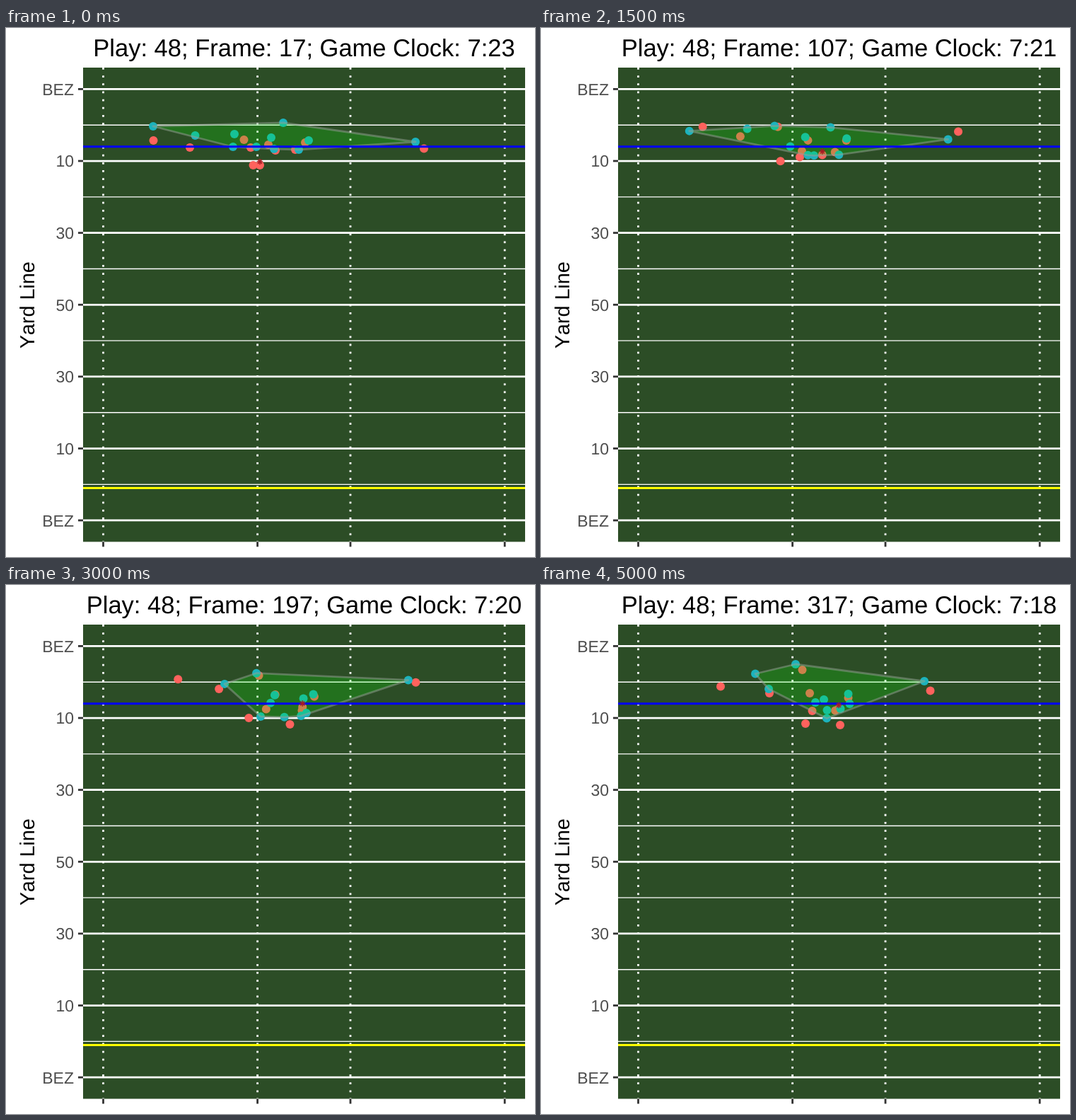
Recreate the animation shown at these times as an HTML page with a canvas. Size 748 by 748 pixels, loop 5.5 s.

```html
<!DOCTYPE html>
<html lang="en">
<head>
<meta charset="utf-8">
<title>Play tracking</title>
<style>
html, body { margin: 0; width: 100%; height: 100%; overflow: hidden; background: #fff; }
canvas { display: block; }
</style>
</head>
<body>
<canvas id="stage" width="748" height="748"></canvas>
<script>
const ctx = document.getElementById('stage').getContext('2d');
const FONT = '"Liberation Sans", Arial, sans-serif';
const STEP = 500, STEPS = 11;
const LEFT = 109, RIGHT = 734, TOP = 56, BOTTOM = 726.5;
const FIRST = 86.4, GAP = 101.63, LINE = 2.79;
const HASHES = [137.5, 355.6, 487, 705.2];
const LABELS = ['BEZ', '10', '30', '50', '30', '10', 'BEZ'];

// Smooth curve through evenly timed key points; three of them make a parabola
function curve(keys) {
  const n = keys.length - 1;
  const beyond = (a, b, c) => 3 * a - 3 * b + c;
  const v = [beyond(keys[0], keys[1], keys[2]), ...keys, beyond(keys[n], keys[n - 1], keys[n - 2])];
  return t => {
    const i = Math.min(Math.floor(t * n), n - 1), u = t * n - i;
    const [a, b, c, d] = v.slice(i, i + 4);
    return b + u / 2 * (c - a + u * (2 * a - 5 * b + 4 * c - d + u * (3 * (b - c) + d - a)));
  };
}

function path(...points) {
  const x = curve(points.map(p => p[0])), y = curve(points.map(p => p[1]));
  return t => ({ x: x(t), y: y(t) });
}

const runner = path([359, 194], [414, 174], [421, 175]);

const offense = [
  path([208.5, 159], [239, 134], [254, 143.5]),
  path([260, 169], [295, 148], [323, 153]),
  path([336.5, 158], [336, 138], [362, 126], [369.5, 120]),
  path([371, 165], [380, 156], [380, 153]),
  path([346, 169], [369, 184], [408, 199], [423, 198]),
  path([349.5, 194], [340, 187.5], [374, 196]),
  path([381, 173], [367, 175], [383.5, 178]),
  path([409, 172], [418, 177], [416, 177.5]),
  path([423, 162], [435, 158], [434.5, 159.5]),
  path([591, 170.5], [584, 139], [550.5, 149.5]),
  runner
];

const defense = [
  path([208, 139], [208, 138], [228, 157], [360, 186], [410, 165], [303, 125.5]),
  path([267.5, 152], [304, 140], [322, 147]),
  path([323, 150], [332, 137], [358, 122], [360, 112]),
  path([321, 168], [368, 167], [388, 166]),
  path([354, 168], [389, 185], [404, 188.5]),
  path([375, 155], [377, 155], [400, 162]),
  path([379, 171], [388, 181], [421, 185], [404.5, 177]),
  path([414, 172], [424, 181], [423.5, 175]),
  path([428, 159], [434, 155], [434.5, 154]),
  path([579, 161], [575, 156], [566, 131], [542, 136]),
  path([392, 134], [411, 142], [423, 164], [436.5, 168])
];

function hull(points) {
  const sorted = [...points].sort((a, b) => a.x - b.x || a.y - b.y);
  const half = list => {
    const out = [];
    for (const p of list) {
      while (out.length > 1) {
        const a = out[out.length - 2], b = out[out.length - 1];
        if ((b.x - a.x) * (p.y - a.y) - (b.y - a.y) * (p.x - a.x) > 0) break;
        out.pop();
      }
      out.push(p);
    }
    return out.slice(0, -1);
  };
  return [...half(sorted), ...half(sorted.reverse())];
}

function line(x1, y1, x2, y2, color, width) {
  ctx.strokeStyle = color;
  ctx.lineWidth = width;
  ctx.beginPath();
  ctx.moveTo(x1, y1);
  ctx.lineTo(x2, y2);
  ctx.stroke();
}

const across = (y, color, width) => line(LEFT, y, RIGHT, y, color, width);

function text(str, x, y, size, color, align) {
  ctx.font = size + 'px ' + FONT;
  ctx.fillStyle = color;
  ctx.textAlign = align;
  ctx.fillText(str, x, y);
}

function dot(p, color) {
  ctx.fillStyle = color;
  ctx.beginPath();
  ctx.arc(p.x, p.y, 6, 0, Math.PI * 2);
  ctx.fill();
}

function drawField() {
  ctx.fillStyle = '#fff';
  ctx.fillRect(0, 0, 748, 748);
  ctx.fillStyle = '#2c4d26';
  ctx.fillRect(LEFT, TOP, RIGHT - LEFT, BOTTOM - TOP);
  LABELS.forEach((label, i) => {
    const y = FIRST + i * GAP;
    if (i < LABELS.length - 1) across(y + GAP / 2, '#fff', LINE / 2);
    across(y, '#fff', LINE);
    line(LEFT - 7, y, LEFT, y, '#333', LINE);
    text(label, 96, y + 8.4, 23, '#4d4d4d', 'right');
  });
  for (const x of HASHES) {
    ctx.setLineDash([LINE, LINE * 3]);
    line(x, TOP, x, BOTTOM, '#fff', LINE);
    ctx.setLineDash([]);
    line(x, BOTTOM, x, BOTTOM + 7, '#333', LINE);
  }
  ctx.save();
  ctx.translate(40.3, 391.8);
  ctx.rotate(-Math.PI / 2);
  text('Yard Line', 0, 0, 28.75, '#000', 'center');
  ctx.restore();
}

function drawTitle(step) {
  const clock = 443 - Math.ceil(step / 2);
  const time = Math.floor(clock / 60) + ':' + String(clock % 60).padStart(2, '0');
  text(`Play: 48; Frame: ${17 + step * 30}; Game Clock: ${time}`, 421.5, 39.5, 34.5, '#000', 'center');
}

function drawBall({ x, y }) {
  for (let i = 0; i < 4; i++) {
    const dx = 4.2 * Math.cos(i * Math.PI / 4), dy = 4.2 * Math.sin(i * Math.PI / 4);
    line(x - dx, y - dy, x + dx, y + dy, '#a81c24', 1.5);
  }
}

function drawHull(points) {
  ctx.beginPath();
  for (const p of hull(points)) ctx.lineTo(p.x, p.y);
  ctx.closePath();
  ctx.fillStyle = 'rgba(0,255,0,.2)';
  ctx.fill();
  ctx.strokeStyle = 'rgba(150,160,150,.5)';
  ctx.lineWidth = LINE;
  ctx.lineJoin = 'round';
  ctx.stroke();
}

function draw(step) {
  const t = step / (STEPS - 1);
  const defenders = defense.map(at => at(t));
  const carrier = runner(t);
  drawField();
  drawTitle(step);
  offense.forEach(at => dot(at(t), '#ff625d'));
  defenders.forEach(p => dot(p, '#1cb3bd'));
  drawHull(defenders);
  across(167.7, '#00f', 3);
  across(650.5, '#ff0', LINE);
  drawBall({ x: carrier.x, y: carrier.y - 5 });
}

ctx.fontKerning = 'none';
ctx.textRendering = 'geometricPrecision';
const start = performance.now();
function tick() {
  const elapsed = performance.now() - start;
  draw(Math.floor(elapsed / STEP) % STEPS);
  requestAnimationFrame(tick);
}
tick();
</script>
</body>
</html>
```
